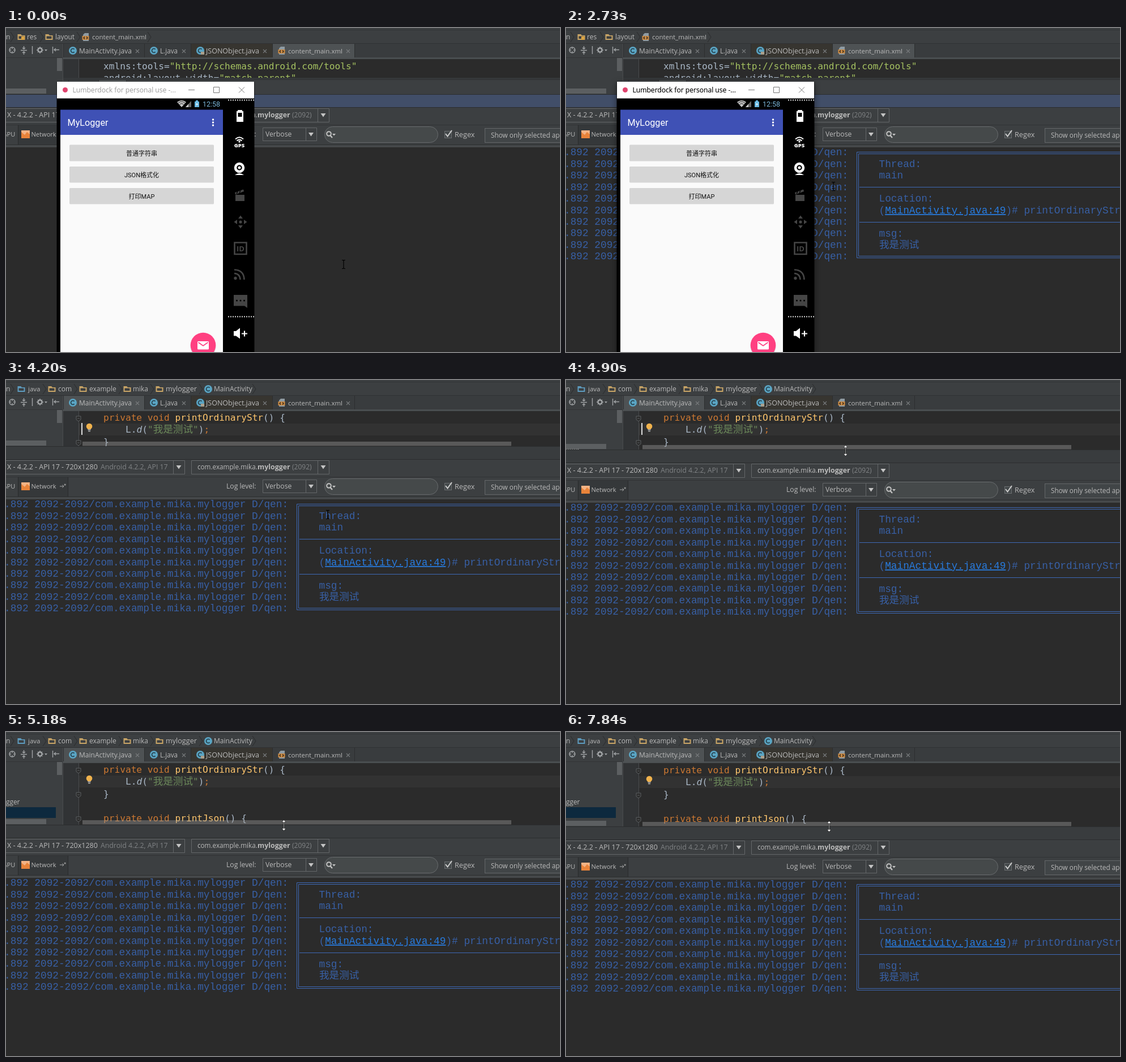
An HTML page for the animation above (8000 ms loop, 978 by 573 pixels).

```html
<!DOCTYPE html>
<html lang="en">
<head>
<meta charset="utf-8">
<title>Logger demo</title>
<style>
html,body{margin:0;width:100%;height:100%;overflow:hidden;background:#2b2b2b}
svg{display:block;width:978px;height:573px;font:12px 'Open Sans','Noto Sans CJK SC','Noto Sans CJK',sans-serif;fill:#bbb}
text{white-space:pre}
.code{font:16.17px 'DejaVu Sans Mono','Noto Sans CJK SC','Noto Sans CJK',monospace;fill:#a9b7c6}
.log{font:17.78px 'Liberation Mono','Noto Sans CJK SC','Noto Sans CJK',monospace;fill:#3860a6}
.app{font:11px Roboto,'Noto Sans CJK SC','Noto Sans CJK',sans-serif;fill:#111;text-anchor:middle}
.kw{fill:#cc7832}.fn{fill:#ffc66d}.str{fill:#6a8759}.val{fill:#a5c261}
.cjk{font-size:17.6px}
.line{fill:none;stroke:#646769}
.a{animation:8s step-end -10ms infinite}

/* views and states */
.xml{animation-name:xml}@keyframes xml{0%{opacity:1}47.25%{opacity:0}}
.java{animation-name:java}@keyframes java{0%{opacity:0}47.25%{opacity:1}}
.path1{animation-name:path1}@keyframes path1{0%{opacity:1}49.875%{opacity:0}}
.path2{animation-name:path2}@keyframes path2{0%{opacity:0}49.875%{opacity:1}}
.emu{animation-name:emu}@keyframes emu{0%{opacity:1}45.5%{opacity:0}}
.out{animation-name:out}@keyframes out{0%{opacity:0}28.875%{opacity:1}}
.focus{animation-name:focus}@keyframes focus{0%{opacity:0}21.875%{opacity:1}}
.press{animation-name:press}@keyframes press{0%{opacity:0}21.875%{opacity:.06}22.75%{opacity:.14}24.5%{opacity:.1}25.375%{opacity:.05}26.25%{opacity:0}}
.bulb{animation-name:bulb}@keyframes bulb{0%{opacity:0}49.875%{opacity:1}72.625%{opacity:0}92.75%{opacity:1}}
.caret1{animation-name:caret1}@keyframes caret1{0%{opacity:0}45.5%{opacity:1}47.25%{opacity:0}}
.caret2{animation-name:caret2}@keyframes caret2{0%{opacity:0}48.125%{opacity:1}62.125%{opacity:0}}
.caret3{animation-name:caret3}@keyframes caret3{0%{opacity:0}83.125%{opacity:1}88.375%{opacity:0}}

/* dragging the divider and the selection */
.panel{animation-name:panel}
@keyframes panel{
0%{transform:translateY(0)}
61.25%{transform:translateY(6px);animation-timing-function:steps(4)}
64.75%{transform:translateY(47px)}
65.625%,100%{transform:translateY(50px)}}
.nudge{animation-name:nudge}@keyframes nudge{0%{transform:none}65.625%,100%{transform:translateY(1px)}}
.sel{animation-name:sel}
@keyframes sel{
0%{transform:translateX(180px)}
72.625%{transform:translateX(180px);animation-timing-function:steps(5)}
77%{transform:translateX(19px)}
78.75%{transform:translateX(19px);animation-timing-function:steps(3)}
81.375%{transform:none}
83.125%,100%{transform:translateX(180px)}}

/* pointer */
.ibeam{animation-name:ibeam}@keyframes ibeam{0%{opacity:1}15.75%{opacity:0}33.25%{opacity:1}53.4%{opacity:0}70%{opacity:1}91.875%{opacity:0}}
.arrow{animation-name:arrow}@keyframes arrow{0%{opacity:0}15.75%{opacity:1}33.25%{opacity:0}53.4%{opacity:1}56.875%{opacity:0}91.875%{opacity:1}97%{opacity:0}}
.size{animation-name:size}@keyframes size{0%{opacity:0}56.875%{opacity:1}70%{opacity:0}97%{opacity:1}}
.cur{animation-name:cur}
@keyframes cur{
0%{transform:translate(596px,418px)}
1.75%{transform:translate(596px,418px);animation-timing-function:steps(6)}
7%{transform:translate(581px,405px)}
10.5%{transform:translate(581px,405px);animation-timing-function:steps(6)}
15.75%{transform:translate(424px,350px);animation-timing-function:steps(6)}
21%{transform:translate(254px,205px)}
28%{transform:translate(254px,206px);animation-timing-function:steps(12)}
38.5%{transform:translate(628px,333px)}
49%{transform:translate(628px,333px);animation-timing-function:steps(9)}
56.875%{transform:translate(493px,119px)}
61.25%{transform:translate(493px,125px);animation-timing-function:steps(4)}
64.75%{transform:translate(490px,165px)}
65.625%{transform:translate(490px,168px)}
66.5%{transform:translate(490px,168px);animation-timing-function:steps(3)}
69.125%{transform:translate(638px,167px);animation-timing-function:steps(2)}
70.875%{transform:translate(413px,128px);animation-timing-function:steps(2)}
72.625%{transform:translate(385px,89px);animation-timing-function:steps(5)}
77%{transform:translate(204px,78px)}
78.75%{transform:translate(204px,78px);animation-timing-function:steps(3)}
81.375%{transform:translate(183px,88px)}
82.25%{transform:translate(183px,88px);animation-timing-function:steps(5)}
86.625%{transform:translate(378px,97px)}
87.5%{transform:translate(378px,97px);animation-timing-function:steps(5)}
91.875%{transform:translate(500px,150px);animation-timing-function:steps(3)}
94.5%{transform:translate(638px,200px);animation-timing-function:steps(4)}
98%,100%{transform:translate(464px,167px)}}
</style>
</head>
<body>
<svg viewBox="0 0 978 573">
<defs>
  <g id="cls"><circle r="7" fill="#5aa5c4"/><path d="M2.6-2.4A3.5 3.5 0 1 0 2.6 2.4" fill="none" stroke="#26404c" stroke-width="1.7"/></g>
  <g id="doc"><path d="M-5-4-2-7H5V7H-5z" fill="#8f9ba3"/><rect x="-6.5" y="-2" width="12" height="7" fill="#c98a45"/><path d="M-2-.5-4 1.5-2 3.5M1-.5 3 1.5 1 3.5" fill="none" stroke="#2e2416" stroke-width="1.3"/></g>
  <path id="dir" d="M-6.5-5H-1L1-3H6.5V5H-6.5zM-4.5-1.5V3H4.5V-1.5z" fill-rule="evenodd"/>
  <path id="sep" d="M0-9 6 0 0 9" fill="none" stroke="#2a2c2d"/>
  <path id="x" d="M-3-3 3 3M3-3-3 3" stroke="#777a7c" stroke-width="1.2"/>
  <path id="drop" d="M-4.5-3H4.5L0 3.5z" fill="#c4c4c4"/>
  <g id="fold" fill="#2b2b2b" stroke="#5c6062"><path d="M-4-4H4V2L0 5-4 2z"/><path d="M-2 0H2"/></g>
  <clipPath id="selClip"><rect x="181" y="70" width="178" height="40"/></clipPath>
  <clipPath id="xmlClip"><rect y="55" width="978" height="34"/></clipPath>
  <filter id="blur" x="-20%" width="140%" y="-10%" height="120%"><feGaussianBlur stdDeviation="6"/></filter>
</defs>

<rect width="978" height="573" fill="#3c3f41"/>
<path d="M0 3.5H978" stroke="#313335"/>
<path d="M0 27.5H978" stroke="#2f3133"/>

<!-- breadcrumbs -->
<g class="a path1">
  <text x="0" y="20">n</text><use href="#sep" x="8" y="16"/>
  <use href="#dir" x="27" y="16" fill="#c9a566"/><path d="M27 15h6v6h-6z" fill="#d9a343"/><text x="37" y="20">res</text><use href="#sep" x="60" y="16"/>
  <use href="#dir" x="76" y="16" fill="#c9a566"/><text x="87" y="20" font-size="11.8">layout</text><use href="#sep" x="125" y="16"/>
  <use href="#doc" x="141" y="16"/><text x="152" y="20" font-size="11.5">content_main.xml</text><use href="#sep" x="250" y="16"/>
</g>
<g class="a path2">
  <text x="0" y="20">n</text><use href="#sep" x="8" y="16"/>
  <use href="#dir" x="27" y="16" fill="#5d9cc0"/><text x="39" y="20" font-size="11.5">java</text><use href="#sep" x="65" y="16"/>
  <use href="#dir" x="81" y="16" fill="#c9a566"/><text x="92" y="20">com</text><use href="#sep" x="120" y="16"/>
  <use href="#dir" x="136" y="16" fill="#c9a566"/><text x="147" y="20">example</text><use href="#sep" x="199" y="16"/>
  <use href="#dir" x="214" y="16" fill="#c9a566"/><text x="224" y="20" font-size="11.8">mika</text><use href="#sep" x="255" y="16"/>
  <use href="#dir" x="271" y="16" fill="#c9a566"/><text x="282" y="20" font-size="12.6">mylogger</text><use href="#sep" x="341" y="16"/>
  <use href="#cls" x="357" y="16"/><text x="367" y="20">MainActivity</text><use href="#sep" x="435" y="16"/>
</g>

<!-- project pane -->
<g fill="none" stroke="#a0a3a5" stroke-width="1.4">
  <circle cx="11" cy="39" r="5"/><path d="M11 34v3M11 41v3M6 39h3M13 39h3M26 39.5H37M31.5 32v5M31.5 42v5M29 35l2.5 2 2.5-2M29 44l2.5-2 2.5 2M46.5 32V46"/>
  <circle cx="60" cy="39" r="3.5" stroke-width="2.4"/><path d="M60 33V35M60 43V45M54 39H56M64 39H66M56 35l1 1M64 35l-1 1M56 43l1-1M64 43l-1-1"/>
  <path d="M82.5 33V45M85 38.5H94M88 36l-3 2.5 3 2.5"/>
</g>
<path d="M68 38H73L70.5 41z" fill="#a0a3a5"/>
<path d="M0 52.5H100" stroke="#323436"/>
<text x="0" y="128" font-size="11.8">gger</text>
<rect y="133" width="88" height="19" fill="#0d293e"/>
<rect x="90" y="53" width="9" height="23" fill="#5c5f61"/>

<!-- tabs -->
<rect x="101" y="28" width="877" height="25" fill="#393c3e"/>
<rect x="326" y="28" width="144" height="24" fill="#373530"/>
<rect x="101" y="52" width="877" height="4" fill="#4a4e50"/>
<rect class="a xml" x="470" y="28" width="145" height="26" fill="#4e5254"/>
<rect class="a java" x="101" y="28" width="143" height="26" fill="#4e5254"/>
<path d="M101.5 28V52M244.5 28V52M326.5 28V52M470.5 28V52M615.5 28V52" stroke="#2c2e2f"/>
<use href="#cls" x="118" y="40"/><text x="129" y="45">MainActivity.java</text><use href="#x" x="232" y="41"/>
<use href="#cls" x="261" y="40"/><text x="272" y="45" font-size="11.7">L.java</text><use href="#x" x="314" y="41"/>
<use href="#cls" x="343" y="40"/><rect x="344" y="42" width="6" height="5" fill="#aaa08d"/><text x="353" y="45" font-size="12.5">JSONObject.java</text><use href="#x" x="457" y="41"/>
<use href="#doc" x="487" y="40"/><text x="498" y="45" font-size="11.5">content_main.xml</text><use href="#x" x="604" y="41"/>

<!-- editor -->
<rect x="101" y="55" width="877" height="130" fill="#2b2b2b"/>
<rect x="101" y="55" width="27" height="130" fill="#313335"/>
<path d="M128.5 55V185M100.5 28V185" stroke="#4a4c4e"/>
<g class="a xml">
  <g clip-path="url(#xmlClip)">
    <text class="code" x="172" y="73">xmlns:tools=<tspan class="val">"http://schemas.android.com/tools"</tspan></text>
    <text class="code" x="172" y="94">android:layout_width=<tspan class="val">"match_parent"</tspan></text>
  </g>
  <rect x="101" y="88" width="877" height="3" fill="#35383a"/>
  <rect x="101" y="91" width="877" height="27" fill="#3c3f41"/>
  <rect x="163" y="91" width="49" height="26" fill="#4e5254"/>
  <path d="M101 91.5H978M110.5 92V117M163.5 92V117M212.5 92V117" stroke="#303234"/>
  <text x="119" y="108" font-size="12.2">Design</text><text x="178" y="108">Text</text>
</g>
<g class="a java"><g class="a nudge">
  <rect x="129" y="77" width="849" height="21" fill="#323232"/>
  <use href="#fold" x="128" y="68"/><use href="#fold" x="128" y="111"/><use href="#fold" x="128" y="154"/>
  <g clip-path="url(#selClip)"><g class="a sel"><rect x="182" y="77" width="177" height="21" fill="#214283"/><rect x="182" y="76" width="2" height="22" fill="#ddd"/></g></g>
  <text class="code" x="172" y="72"><tspan class="kw">private void </tspan><tspan class="fn">printOrdinaryStr</tspan>() {</text>
  <text class="code" x="211" y="93">L.<tspan font-style="italic">d</tspan>(<tspan class="str">"<tspan class="cjk">我是测试</tspan>"</tspan>)<tspan class="kw">;</tspan></text>
  <text class="code" x="172" y="115">}</text>
  <text class="code" x="172" y="158"><tspan class="kw">private void </tspan><tspan class="fn">printJson</tspan>() {</text>
  <g class="a bulb"><circle cx="147" cy="82" r="5.3" fill="#f0b24c"/><path d="M144 85h6v2h-6z" fill="#f0b24c"/><path d="M144.5 88H149.5M145 90.5H149" stroke="#b8b8b8" stroke-width="1.5"/></g>
  <rect class="a caret2" x="133" y="76" width="2" height="21" fill="#ddd"/>
  <rect class="a caret3" x="359" y="77" width="2" height="20" fill="#ddd"/>
</g></g>

<!-- log pane -->
<g class="a panel">
  <rect y="107" width="71" height="9" fill="#5c5f61"/>
  <rect class="a java" x="135" y="109" width="757" height="7.5" fill="#a0a0a0" fill-opacity=".4"/>
  <rect y="117" width="978" height="460" fill="#3c3f41"/>
  <rect class="a xml" y="118" width="978" height="22" fill="#414e68"/>
  <rect class="a java" y="118" width="978" height="22" fill="#393c3e"/>
  <path d="M0 117.5H978M0 140.5H978" stroke="#2b2d2e"/>
  <path d="M0 171.5H978" stroke="#313335"/>
  <path class="line" d="M-2 142.5H315.5V166.5H-2M295.5 143V166M327.5 142.5H570.5V166.5H327.5zM550.5 143V166"/>
  <text x="2" y="158" font-size="12.5">X - 4.2.2 - API 17 - 720x1280</text><text x="167" y="158" font-size="12.3" fill="#808385">Android 4.2.2, API 17</text>
  <use href="#drop" x="305" y="154"/>
  <text x="338" y="158" font-size="11.7">com.example.mika.</text><text x="444" y="158" font-size="12.4" font-weight="700">mylogger</text><text x="505" y="158" fill="#808385">(2092)</text>
  <use href="#drop" x="560" y="154"/>
  <text x="-6.5" y="192" font-size="11">GPU</text>
  <rect x="21" y="172" width="89" height="35" fill="#35383a"/>
  <path d="M21.5 172V207M109.5 172V207" stroke="#292b2c"/>
  <rect x="27" y="181" width="15" height="14" fill="#e8833a"/><path d="M27 181H42V188L37 184 33 189 27 184z" fill="#f3b384"/>
  <text x="44.5" y="192" font-size="11.1">Network</text>
  <path d="M95 188H102M99.5 185.5 102 188 99.5 190.5M104 183.5V187M102.5 185H106" fill="none" stroke="#aaa"/>
  <text x="389" y="192" font-size="12.2">Log level:</text>
  <path class="line" d="M453.5 176.5H548.5V199.5H453.5zM529.5 177V199"/>
  <text x="458" y="192" font-size="12.2">Verbose</text><use href="#drop" x="538.5" y="188"/>
  <rect x="562.5" y="174.5" width="200" height="28" rx="14" fill="#45494a" stroke="#686b6d"/>
  <circle cx="570" cy="187" r="3.8" fill="none" stroke="#c4c4c4" stroke-width="2"/><path d="M572.5 190 576 194" stroke="#c4c4c4" stroke-width="2.2"/><path d="M576 187H582L579 190.5z" fill="#c4c4c4"/>
  <rect x="774.5" y="182.5" width="12" height="12" fill="#43484a" stroke="#6c6f71"/><path d="M776 187 779.5 191.5 787 181" fill="none" stroke="#ccc" stroke-width="2"/>
  <text x="792" y="193" font-size="12.7">Regex</text>
  <rect x="845.5" y="177.5" width="150" height="25" fill="#414547" stroke="#646769"/><text x="856" y="193.5" font-size="11.8">Show only selected application</text>
  <rect y="206" width="978" height="1" fill="#2c2e2f"/><rect y="207" width="978" height="4" fill="#45484a"/>
  <rect y="211" width="978" height="370" fill="#2b2b2b"/>
  <g class="a out">
    <g id="rows" class="log"></g>
    <path d="M978 219.5H513.5V406.5H978M978 222.5H516.5V403.5H978M518 281.5H978M518 343.5H978" fill="none" stroke="#3e69b6"/>
    <g class="log">
      <text x="552.5" y="246">Thread:</text><text x="552.5" y="266">main</text>
      <text x="552.5" y="307">Location:</text>
      <text x="552.5" y="328">(<tspan fill="#287bde" text-decoration="underline">MainActivity.java:49</tspan>)# printOrdinaryStr</text>
      <text x="552.5" y="369">msg:</text><text class="cjk" x="553" y="389">我是测试</text>
    </g>
  </g>
  <rect class="a caret1" x="628.5" y="312" width="1.5" height="21" fill="#ddd"/>
</g>

<!-- emulator window -->
<g class="a emu">
  <rect class="a focus" x="90" y="98" width="348" height="490" fill="#000" fill-opacity=".5" filter="url(#blur)"/>
  <rect x="89.5" y="95" width="349" height="480" fill="#000"/>
  <rect x="90" y="95" width="348" height="29.5" fill="#fff"/>
  <circle cx="104.5" cy="109.5" r="4.5" fill="#e0446e"/>
  <text x="117.5" y="114" font-size="12.1" fill="#9a9a9a">Lumberdock for personal use -...</text>
  <text class="a focus" x="117.5" y="114" font-size="12.1" fill="#000">Lumberdock for personal use -...</text>
  <path d="M322 109.5H333M366.5 104.5H376.5V114.5H366.5zM411 104.5 421 114.5M421 104.5 411 114.5" fill="none" stroke="#777"/>
  <path d="M302 131Q310 125 318 131L310 140z" fill="#c8c8c8"/><path d="M304 132.5Q310 128 316 132.5M306.5 135Q310 132 313.5 135" fill="none" stroke="#222"/>
  <path d="M317 140H327V129z" fill="#666"/><path d="M317 140H322V134.5z" fill="#ccc"/>
  <path d="M333 130H335V128H339V130H341V140H333z" fill="#67b7e1"/><path d="M338 131 335 135.5H337L336 139 339 134H337z" fill="#fff"/>
  <text x="347" y="139" style="font:12.5px Roboto,sans-serif" fill="#7cb9dc">12:58</text>
  <rect x="96" y="144.5" width="287" height="44.5" fill="#3f51b5"/>
  <text x="108.5" y="173" style="font:16.2px Roboto,sans-serif" fill="#fff">MyLogger</text>
  <path d="M365.5 162V173" stroke="#fff" stroke-width="3.5" stroke-linecap="round" stroke-dasharray="0 5"/>
  <rect x="96" y="189" width="287" height="390" fill="#fafafa"/>
  <g fill="#d6d6d6"><rect x="112" y="206.5" width="255" height="29" rx="1.5"/><rect x="112" y="245" width="255" height="28.5" rx="1.5"/><rect x="112" y="283" width="255" height="28.5" rx="1.5"/></g>
  <rect class="a press" x="112" y="206.5" width="255" height="29" rx="1.5" fill="#000"/>
  <text class="app" x="239.5" y="225.5">普通字符串</text><text class="app" x="239.5" y="263.5">JSON格式化</text><text class="app" x="239.5" y="301.5">打印MAP</text>
  <circle cx="348" cy="563" r="22.5" fill="#bbb" opacity=".5"/><circle cx="348" cy="561" r="22.3" fill="#ff4081"/>
  <rect x="338" y="554" width="20" height="14.5" rx="1.5" fill="#fff"/><path d="M339.5 556 348 562 356.5 556" fill="none" stroke="#ff4081" stroke-width="1.7"/>

  <path d="M392 127.5H438M392 510.5H438" stroke="#ddd" stroke-width="2" stroke-dasharray="2"/>
  <path d="M409 145H417V147H419V166H407V147H409zM409.5 150V157H416.5V150z" fill="#fff" fill-rule="evenodd"/>
  <path d="M405 196.5Q412 190 419 196.5M407.5 199.5Q412 195.5 416.5 199.5" fill="none" stroke="#fff" stroke-width="1.8"/><circle cx="412" cy="201" r="1.7" fill="#fff"/>
  <text x="412" y="211" font-size="9.5" font-weight="800" text-anchor="middle" fill="#fff">GPS</text>
  <circle cx="412" cy="247" r="7" fill="none" stroke="#fff" stroke-width="4.5"/><circle cx="412" cy="247" r="2.5" fill="#fff"/><path d="M404 260Q412 254 420 260z" fill="#fff"/>
  <g fill="#454545">
    <path d="M405 295H421V306H405zM404 291 419 285.5 420 289 405 294.5z"/>
    <circle cx="414" cy="343" r="2.6"/><path d="M410 337 414 331.5 418 337zM410 349 414 354.5 418 349zM408 339 402.5 343 408 347zM420 339 425.5 343 420 347z"/>
    <circle cx="405" cy="442.5" r="2.7"/>
    <path d="M402 472H426V495L421 491.5H402z"/>
  </g>
  <path d="M407 293 409 289M412 291.5 414 287.5" stroke="#000" stroke-width="1.5"/>
  <path d="M403.5 379.5H424.5V400H403.5zM403 434Q413 434.5 413.5 445M403 427.5Q420 428 420.5 445" fill="none" stroke="#454545" stroke-width="2.6"/>
  <text x="414" y="395" font-size="13" font-weight="700" text-anchor="middle" fill="#454545">ID</text>
  <path d="M407.5 482H421" stroke="#000" stroke-width="3" stroke-linecap="round" stroke-dasharray="0 6.5"/>
  <path d="M402 536H406L413 530.5V549.5L406 544.5H402z" fill="#fff"/><path d="M416 540.5H426M421 535.5V545.5" stroke="#fff" stroke-width="2.2"/>
</g>

<!-- pointer -->
<g class="a cur">
  <path class="a ibeam" d="M-3-7.5H-1L0-6.5 1-7.5H3M0-6.5V6.5M-3 7.5H-1L0 6.5 1 7.5H3" fill="none" stroke="#000" stroke-width="1.2"/>
  <path class="a arrow" d="M.5.5V16.5L4.2 13 6.6 18.5 8.8 17.5 6.4 12H11.5z" fill="#fff" stroke="#000"/>
  <path class="a size" d="M.5-9.5 4-5.5H1V5.5H4L.5 9.5-3 5.5H0V-5.5H-3z" fill="#fff" stroke="#000" stroke-width=".5"/>
</g>
</svg>
<script>
const rows = document.getElementById('rows');
for (let i = 0; i < 10; i++) {
  const row = document.createElementNS('http://www.w3.org/2000/svg', 'text');
  row.setAttribute('x', -3);
  row.setAttribute('y', 225.3 + i * 20.45);
  row.textContent = '.892 2092-2092/com.example.mika.mylogger D/qen:';
  rows.append(row);
}
</script>
</body>
</html>
```
